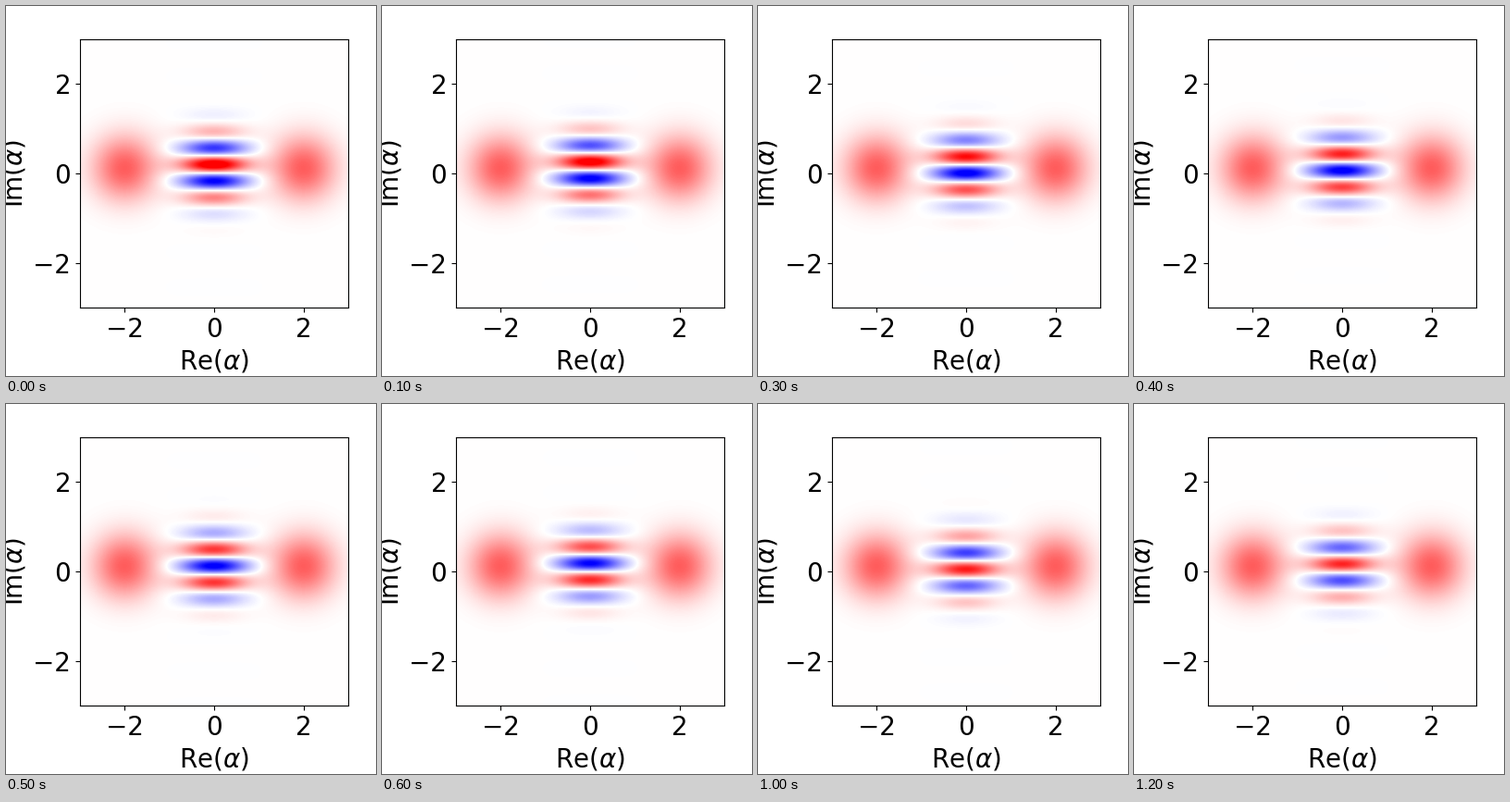
A matplotlib script for the animation above (1.3 s loop, 400 by 400 pixels).

```python
import numpy as np
import matplotlib.pyplot as plt
from matplotlib.animation import FuncAnimation

FRAMES, INTERVAL = 13, 100
SPAN, PIXELS = 3, 290
BETA, Y0 = 2.0, 0.12          # lobe separation and common height
RED_Y, PHASE_STEP = 0.205, 0.5
CONTRAST, DECAY = 0.96, 0.028

plt.rcParams.update({"font.family": "DejaVu Sans", "font.size": 20})

half = SPAN / PIXELS
axis = np.linspace(-SPAN + half, SPAN - half, PIXELS)
X, Y = np.meshgrid(axis, axis)


def gauss(cx):
    return np.exp(-2 * ((X - cx) ** 2 + (Y - Y0) ** 2))


lobes = (gauss(-BETA) + gauss(BETA)) / np.pi
envelope = 2 * gauss(0) / np.pi


def wigner(i):
    """Cat state whose fringes drift upward while losing coherence."""
    coherence = CONTRAST * np.exp(-DECAY * i)
    fringes = np.cos(4 * BETA * (Y - RED_Y) - PHASE_STEP * i)
    return lobes + coherence * envelope * fringes


fig = plt.figure(figsize=(4, 4), dpi=100, facecolor="white")
ax = fig.add_axes([0.2, 0.185, 0.725, 0.725])
image = ax.imshow(wigner(0), cmap="bwr", vmin=-0.5, vmax=0.5, origin="lower",
                  extent=(-SPAN, SPAN, -SPAN, SPAN), interpolation="nearest")
ax.set_xticks([-2, 0, 2])
ax.set_yticks([-2, 0, 2])
ax.set_xlabel(r"Re($\alpha$)")
ax.set_ylabel(r"Im($\alpha$)")


def update(i):
    image.set_data(wigner(i))
    return [image]


anim = FuncAnimation(fig, update, frames=FRAMES, interval=INTERVAL,
                     init_func=lambda: update(0), repeat=True, repeat_delay=0)
plt.show()
```
